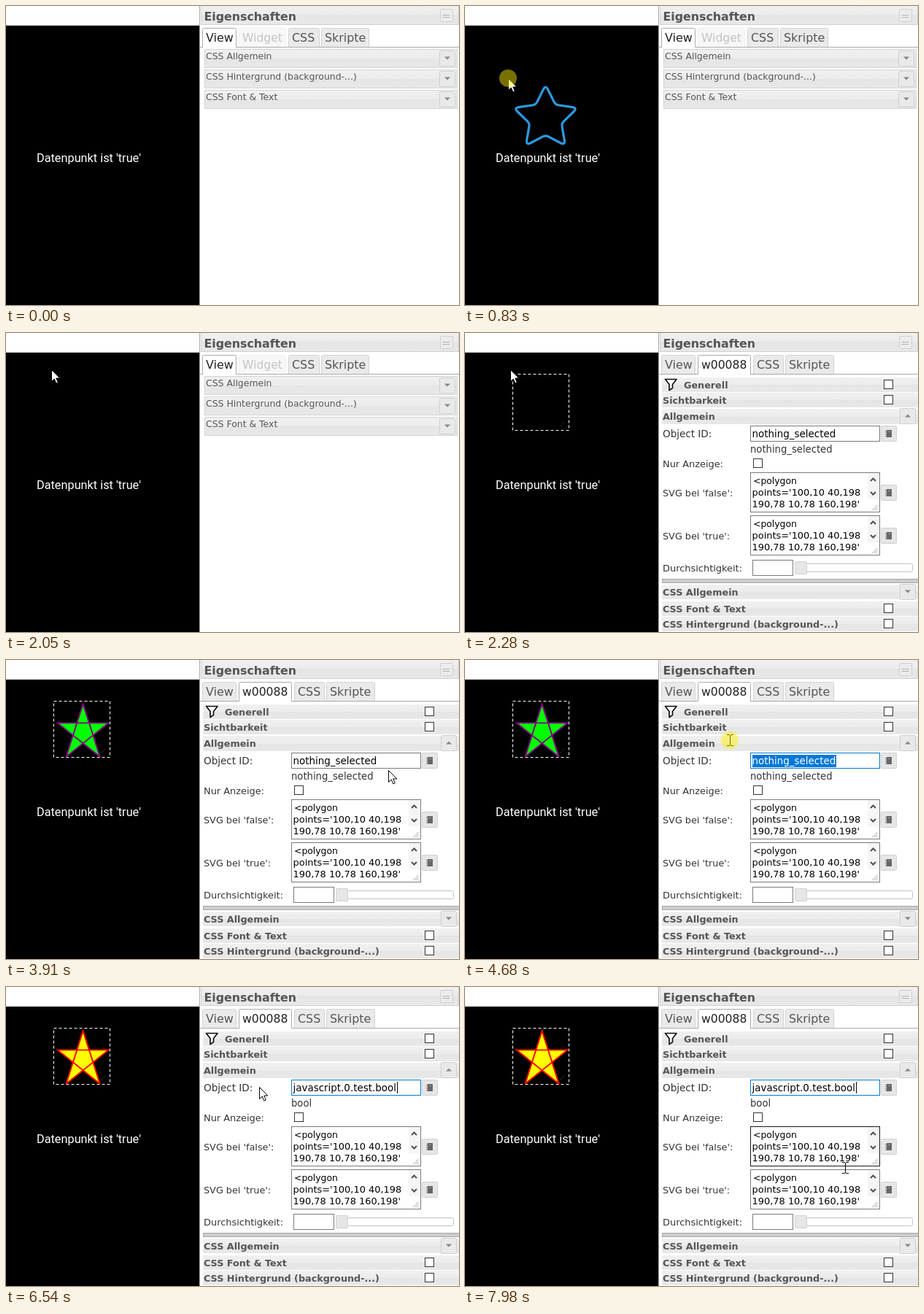
An HTML page that plays this animation: 621 px wide and 410 px high, repeating every 8000 ms.

```html
<!DOCTYPE html>
<html lang="de">
<head>
<meta charset="utf-8">
<title>Widget-Editor</title>
<style>
html, body { margin: 0; width: 100%; height: 100%; overflow: hidden; background: #fff; }
svg { display: block; width: 100vw; height: 100vh; }
text { font-family: 'DejaVu Sans', sans-serif; white-space: pre; }
.bold { font-weight: bold; }
.roboto { font-family: Roboto, sans-serif; }
</style>
</head>
<body>
<svg id="stage" viewBox="0 0 621 410">
  <defs>
    <linearGradient id="bar" x1="0" y1="0" x2="0" y2="1">
      <stop offset="0" stop-color="#f0f0f0"/><stop offset=".5" stop-color="#ececec"/>
      <stop offset=".5" stop-color="#e5e5e5"/><stop offset="1" stop-color="#e8e8e8"/>
    </linearGradient>
    <clipPath id="frameClip"><rect x="66" y="57" width="76" height="76"/></clipPath>
    <clipPath id="selClip"><rect id="selArea" y="130" height="17"/></clipPath>
  </defs>
</svg>
<script>
const NS = 'http://www.w3.org/2000/svg';
const LOOP = 8000;
const stage = document.getElementById('stage');

function add(parent, tag, attrs, text) {
  const el = document.createElementNS(NS, tag);
  for (const k in attrs) el.setAttribute(k, attrs[k]);
  if (text !== undefined) el.textContent = text;
  parent.appendChild(el);
  return el;
}
const group = parent => add(parent, 'g', {});
const fill = (p, x, y, width, height, color) => add(p, 'rect', { x, y, width, height, fill: color });
const path = (p, d, attrs) => add(p, 'path', { d, ...attrs });
const label = (p, x, y, size, text, color = '#333', cls = '') =>
  add(p, 'text', { x, y, 'font-size': size, fill: color, class: cls }, text);

// Box with a crisp 1px border inside the given bounds
const box = (p, x, y, w, h, bg, line, rx = 0) =>
  add(p, 'rect', { x: x + .5, y: y + .5, width: w - 1, height: h - 1, fill: bg, stroke: line, rx });

function triangle(p, x, y, dir) {
  path(p, `M${x - 4} ${y - 2 * dir}h8l-4 ${4 * dir}z`, { fill: '#8b8282' });
}
function arrowButton(p, x, y, dir) {
  box(p, x, y, 22, 22, '#e9e9e9', '#cfcfcf', 1);
  triangle(p, x + 11, y + 10.5, dir);
}
function iconButton(p, y) {
  box(p, 570, y, 22, 22, '#e6e6e6', '#d0d0d0', 1);
  fill(p, 578, y + 6, 7, 10, '#666');
  for (let i = 0; i < 4; i++) fill(p, 576, y + 7 + i * 2.5, 2, 1, '#777');
  fill(p, 580, y + 8, 3, 1, '#999');
}
const checkbox = (p, x, y) => box(p, x, y, 13, 13, '#fff', '#333');

function tab(p, x, w, text, active, size = 15.9) {
  path(p, `M${x + .5} 56.5V32.5q0-2 2-2H${x + w - 2.5}q2 0 2 2V56.5`,
    { fill: active ? '#fff' : '#eaeaea', stroke: active ? '#aaa' : '#d3d3d3' });
  if (active) fill(p, x + 1, 56, w - 2, 1, '#fff');
  label(p, x + 5, 49, size, text, active ? '#212121' : '#555');
}
const tabLine = p => fill(p, 266, 56, 355, 1, '#aaa');

// Fixed surroundings
const base = group(stage);
fill(base, 0, 0, 621, 410, '#fff');
fill(base, 0, 26, 265, 1, '#ccc');
fill(base, 0, 27, 265, 383, '#000');
fill(base, 265, 0, 1, 410, '#aaa');
box(base, 267, -1, 354, 27, 'url(#bar)', '#d0d0d0');
label(base, 271.5, 20, 15.8, 'Eigenschaften', '#555', 'bold');
box(base, 595, 4, 18, 18, '#ececec', '#cfcfcf', 1);
for (let i = 0; i < 5; i++) {
  fill(base, 599 + i * 2, 12, 1, 1, '#777');
  fill(base, 599 + i * 2, 15, 1, 1, '#777');
}
label(base, 42, 214, 16.3, "Datenpunkt ist 'true'", '#fff', 'roboto');

// Panel while the view is selected
const viewPanel = group(stage);
tabLine(viewPanel);
tab(viewPanel, 269, 47, 'View', true);
const disabled = group(viewPanel);
tab(disabled, 319, 65, 'Widget', false, 15.6);
disabled.setAttribute('opacity', .35);
tab(viewPanel, 387, 43, 'CSS', false);
tab(viewPanel, 432, 66, 'Skripte', false);
fill(viewPanel, 317, 56, 304, 1, '#aaa');
['CSS Allgemein', 'CSS Hintergrund (background-...)', 'CSS Font & Text'].forEach((text, i) => {
  const y = 59 + 28 * i;
  box(viewPanel, 272, y, 347, 26, 'url(#bar)', '#d3d3d3');
  label(viewPanel, 274, y + 14, 12.45, text, '#555');
  arrowButton(viewPanel, 594, y + 2, 1);
});

// Panel while the widget is selected
const panel = group(stage);
tabLine(panel);
tab(panel, 269, 47, 'View', false);
tab(panel, 319, 73, 'w00088', true, 15.6);
tab(panel, 395, 42, 'CSS', false);
tab(panel, 439, 67, 'Skripte', false);
fill(panel, 266, 56, 53, 1, '#aaa');
fill(panel, 392, 56, 229, 1, '#aaa');

function section(y, h, text, x = 271) {
  fill(panel, 270, y, 351, h, 'url(#bar)');
  label(panel, x, y + 15, 12.75, text, '#555', 'bold');
}
section(61, 20, 'Generell', 300);
section(82, 20, 'Sichtbarkeit');
section(104, 21, 'Allgemein');
section(345, 20, 'CSS Allgemein');
section(368, 20, 'CSS Font & Text');
section(389, 20, 'CSS Hintergrund (background-...)');
box(panel, 270, 337, 352, 6, '#ccc', '#aaa');
[64, 85, 371, 392].forEach(y => checkbox(panel, 574, y));
checkbox(panel, 395, 172);
arrowButton(panel, 596, 103, -1);
arrowButton(panel, 596, 344, 1);
path(panel, 'M274.5 63.5H290L284.5 70.5V75.5L280 78.5V70.5Z',
  { fill: '#fff', stroke: '#111', 'stroke-width': 1.7, 'stroke-linejoin': 'round' });

label(panel, 271, 143, 13.5, 'Object ID:');
label(panel, 271, 184, 12.9, 'Nur Anzeige:');
label(panel, 271, 224, 12.8, "SVG bei 'false':");
label(panel, 271, 283, 12.8, "SVG bei 'true':");
label(panel, 271, 327, 12.95, 'Durchsichtigkeit:');

const input = box(panel, 391, 127, 178, 22, '#fff', '#7a7a7a');
const value = label(panel, 393.5, 143, 13.45, '', '#000');
const idLabel = label(panel, 391, 164, 13.2, '');
const selection = group(panel);
selection.setAttribute('clip-path', 'url(#selClip)');
fill(selection, 394, 130, 115, 17, '#0078d7');
label(selection, 393.5, 143, 13.45, 'nothing_selected', '#fff');
const selArea = document.getElementById('selArea');
const caret = fill(panel, 536, 130, 1, 16, '#000');
[127, 208, 267].forEach(y => iconButton(panel, y));

function textarea(y) {
  const el = box(panel, 391, y, 178, 55, '#fff', '#7a7a7a');
  ['<polygon', "points='100,10 40,198", "190,78 10,78 160,198'"].forEach((line, i) =>
    label(panel, i ? 393.5 : 395, y + 16 + 16 * i, i ? 12.95 : 12.4, line, '#000'));
  fill(panel, 552, y + 1, 16, 36, '#f5f5f5');
  const chevron = { fill: 'none', stroke: '#505050', 'stroke-width': 2 };
  path(panel, `M556 ${y + 12}l3.5-3.5 3.5 3.5`, chevron);
  path(panel, `M556 ${y + 27}l3.5 3.5 3.5-3.5`, chevron);
  for (let r = 0; r < 4; r++)
    for (let c = 0; c <= r; c++) fill(panel, 564 - 2 * c, y + 45 + 2 * r, 1, 1, '#888');
  return el;
}
const falseArea = textarea(191);
textarea(250);

box(panel, 394, 311, 56, 22, '#fff', '#7a7a7a');
box(panel, 453, 316, 161, 12, '#fff', '#c4c4c4', 2);
box(panel, 452, 313, 17, 18, '#e6e6e6', '#d0d0d0', 1);

// Placed widget
const widget = group(stage);
const starClip = group(widget);
starClip.setAttribute('clip-path', 'url(#frameClip)');
const star = add(starClip, 'polygon', {
  points: '100,10 40,198 190,78 10,78 160,198',
  transform: 'translate(67 56.3) scale(.386)', 'stroke-width': 5
});
for (let i = 0; i < 3; i++) fill(widget, 131 + 2 * i, 126 - 2 * i, 1, 1, '#444');
add(widget, 'rect', { x: 65.5, y: 56.5, width: 77, height: 77, fill: 'none', stroke: '#fff', 'stroke-dasharray': '4 3' });

// Rounded star outline, top left of its bounds at 0,0
function roundedStar() {
  const pts = Array.from({ length: 10 }, (_, i) => {
    const a = (i * 36 - 90) * Math.PI / 180, r = i % 2 ? 23 : 46;
    return [41.5 + r * Math.cos(a), 44 + r * Math.sin(a)];
  });
  const toward = (p, q, d) => {
    const k = d / Math.hypot(q[0] - p[0], q[1] - p[1]);
    return [p[0] + (q[0] - p[0]) * k, p[1] + (q[1] - p[1]) * k];
  };
  return pts.map((p, i) => {
    const d = i % 2 ? 4.5 : 7.5;
    const from = toward(p, pts[(i + 9) % 10], d), to = toward(p, pts[(i + 1) % 10], d);
    return `${i ? 'L' : 'M'}${from}Q${p} ${to}`;
  }).join('') + 'Z';
}
const ghost = path(stage, roundedStar(),
  { fill: 'none', stroke: '#2b9ae0', 'stroke-width': 3.2, 'stroke-linejoin': 'round' });

// Pointers
const arrow = path(stage, 'M.5 .5V16.5L4.2 13L6.8 18.9L9.3 17.8L6.8 12H11.8Z', { fill: '#fff', stroke: '#000' });
const beam = path(stage, 'M-4 -7.5H-1L.5 -6.5L2 -7.5H5M.5 -6.5V6.5M-4 7.5H-1L.5 6.5L2 7.5H5',
  { fill: 'none', stroke: '#000' });
const press = add(stage, 'circle', { r: 12, fill: '#fff000', 'fill-opacity': .47 });

// time, x, y, shape
const moves = [
  [0, 0, 0, ''],
  [500, 2, 195, 'arrow'], [610, 21, 158, 'arrow'], [720, 42, 124, 'arrow'],
  [830, 59, 99, 'arrow'], [950, 74, 74, 'arrow'], [1050, 80, 66, 'arrow'],
  [1270, 72, 57, 'arrow'], [1390, 65, 52, 'arrow'], [1510, 63, 50, 'arrow'], [1730, 62, 50, 'arrow'],
  [3360, 66, 54, 'arrow'], [3470, 120, 82, 'arrow'], [3580, 250, 125, 'arrow'],
  [3690, 400, 151, 'arrow'], [3800, 500, 156, 'arrow'], [3910, 524, 151, 'arrow'],
  [4030, 519, 141, 'beam'], [4130, 514, 138, 'beam'],
  [4230, 512, 137, 'beam'], [4340, 498, 135, 'beam'], [4450, 456, 128, 'beam'],
  [4560, 405, 118, 'beam'], [4670, 363, 110, 'beam'], [4780, 341, 107, 'beam'],
  [4890, 338, 107, 'beam'], [5000, 336, 108, 'beam'],
  [5120, 336, 109, 'beam'], [5230, 336, 111, 'beam'], [5340, 335, 114, 'beam'],
  [5450, 335, 116, 'beam'], [5560, 335, 117, 'beam'],
  [5680, 341, 128, 'beam'], [5780, 346, 137, 'arrow'], [6010, 347, 137, 'arrow'],
  [7640, 356, 144, 'arrow'], [7750, 408, 180, 'beam'], [7860, 486, 226, 'beam'], [7980, 521, 248, 'beam']
];

const show = (el, on) => el.setAttribute('visibility', on ? 'visible' : 'hidden');
const place = (el, x, y) => el.setAttribute('transform', `translate(${x} ${y})`);
const within = (t, a, b) => t >= a && t < b;

function draw(t) {
  const [, x, y, shape] = moves.findLast(m => m[0] <= t);
  const dragging = within(t, 500, 2050);
  const selecting = within(t, 4230, 5000);
  const open = t >= 2280;
  const pasted = t >= 5450;

  show(arrow, shape === 'arrow');
  show(beam, shape === 'beam');
  show(press, dragging || selecting);
  place(arrow, x, y);
  place(beam, x, y);
  place(press, x, y);

  show(ghost, dragging);
  const settled = t >= 1050;
  place(ghost, x + (settled ? 13 : 10), y + (settled ? 9 : 11));

  viewPanel.style.display = open ? 'none' : '';
  panel.style.display = widget.style.display = open ? '' : 'none';

  const on = t >= 6430;
  show(star, t >= 2380);
  star.setAttribute('fill', on ? '#ff0' : '#0f0');
  star.setAttribute('stroke', on ? '#f00' : '#800080');

  value.textContent = pasted ? 'javascript.0.test.bool' : 'nothing_selected';
  idLabel.textContent = t >= 6320 ? 'bool' : 'nothing_selected';
  input.setAttribute('stroke', t >= 4230 ? '#0078d7' : t >= 4030 ? '#171717' : '#7a7a7a');
  falseArea.setAttribute('stroke', t >= 7750 ? '#171717' : '#7a7a7a');

  const start = Math.min(509, Math.max(394, x));
  selArea.setAttribute('x', start);
  selArea.setAttribute('width', within(t, 4230, 5450) ? 509 - start : 0);
  show(caret, within(t, 5450, 6010) || within(t, 6540, 7000) || t >= 7530);
}

const begin = performance.now();
function tick() {
  draw((performance.now() - begin) % LOOP);
  requestAnimationFrame(tick);
}
tick();
</script>
</body>
</html>
```
